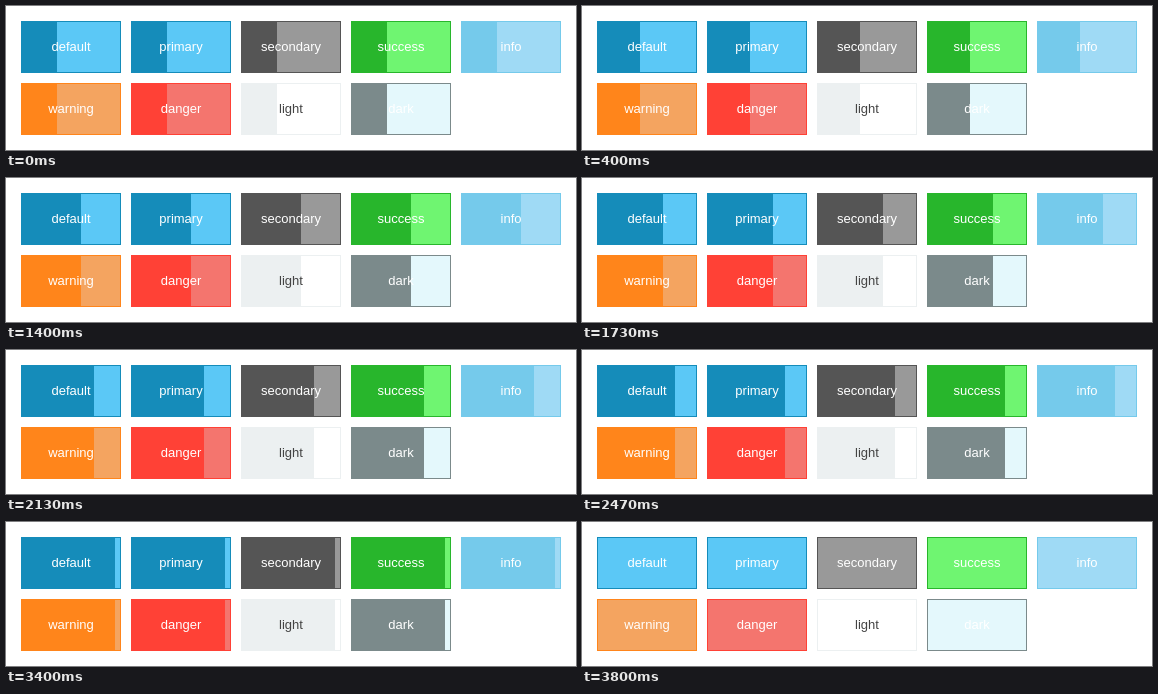
An HTML page that plays this animation: 570 px wide and 144 px high, repeating every 3.87 s.

```html
<!DOCTYPE html>
<html lang="en">
<head>
<meta charset="utf-8">
<title>Progress buttons</title>
<style>
  html, body { margin: 0; width: 100%; height: 100%; overflow: hidden; background: #fff; }
  .button {
    position: absolute; box-sizing: border-box; width: 100px; height: 52px;
    border: 1px solid var(--main); background: var(--pale); color: #fff;
    font: 13px/50px "Liberation Sans", Arial, sans-serif; text-align: center;
  }
  .fill { position: absolute; left: 0; top: 0; height: 50px; width: var(--progress); background: var(--main); }
  .label { position: relative; }
</style>
</head>
<body>
<script>
const LOOP = 3870;
const STEP = 1000 / 15;
const LAST_STEP = 57;

const buttons = [
  ["default", "#158cba", "#5bc8f6"],
  ["primary", "#158cba", "#5bc8f6"],
  ["secondary", "#555555", "#999999"],
  ["success", "#28b62c", "#6ff571"],
  ["info", "#75caeb", "#9fdaf5"],
  ["warning", "#ff851b", "#f4a460"],
  ["danger", "#ff4136", "#f4756e"],
  ["light", "#ecf0f1", "#ffffff", "#444444"],
  ["dark", "#7b8a8b", "#e4f8fc"],
];

// Nearly linear progress as [step, fill width], with a short hesitation.
const progress = [[0, 35], [8, 44], [16, 54], [17, 55], [18, 55], [21, 59], [26, 65], [51, 93], [56, 98]];

buttons.forEach(([name, main, pale, ink = "#fff"], i) => {
  const button = document.createElement("div");
  button.className = "button";
  button.style.cssText = `left:${15 + i % 5 * 110}px; top:${15 + Math.floor(i / 5) * 62}px;
    --main:${main}; --pale:${pale}; color:${ink}`;
  button.innerHTML = `<div class="fill"></div><span class="label">${name}</span>`;
  document.body.append(button);
});

function widthAt(step) {
  if (step >= LAST_STEP) return 0;
  const next = progress.findIndex(([s]) => s > step);
  if (next < 0) return progress.at(-1)[1];
  const [s0, w0] = progress[next - 1], [s1, w1] = progress[next];
  return Math.round(w0 + (w1 - w0) * (step - s0) / (s1 - s0));
}

function draw() {
  const time = performance.now() % LOOP;
  // Steps begin on the nearest hundredth of a second.
  const step = Math.floor((Math.floor(time / 10) * 10 + 4) / STEP);
  document.body.style.setProperty("--progress", widthAt(step) + "px");
  requestAnimationFrame(draw);
}
draw();
</script>
</body>
</html>
```
